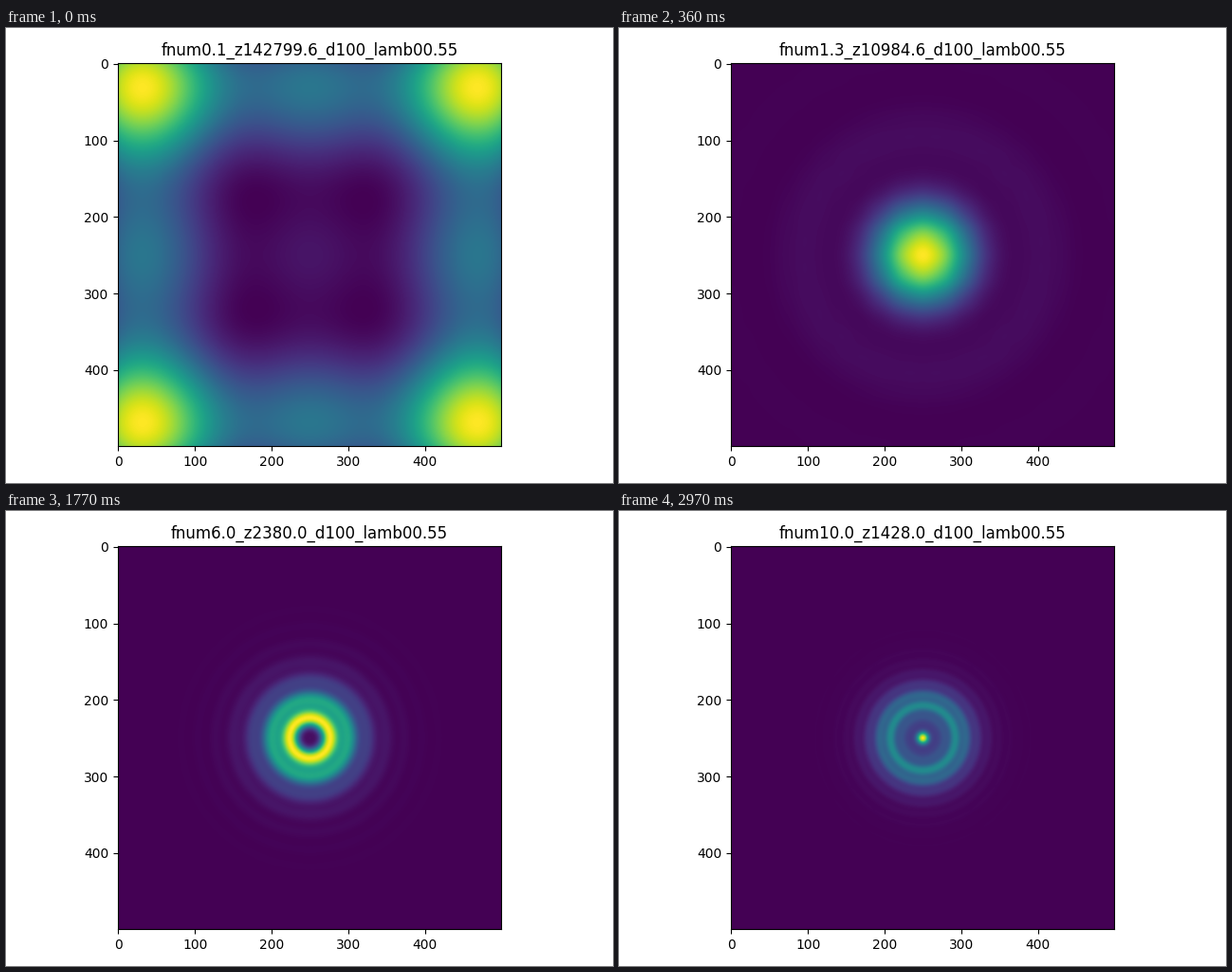
Recreate the animation shown at these times as a matplotlib script. Size 640 by 480 pixels, loop 3 s.

```python
import numpy as np
import matplotlib.pyplot as plt
from matplotlib.animation import FuncAnimation

FRAMES = 100
PIXELS = 500
WIDTH = 300.0      # simulated window, micrometres
DIAMETER = 100
LAMB = 0.55        # wavelength, micrometres
PI = 3.141592

step = WIDTH / PIXELS
axis = (np.arange(PIXELS) - PIXELS // 2) * step
x, y = np.meshgrid(axis, axis)
aperture = (x**2 + y**2 <= (DIAMETER / 2) ** 2).astype(float)

# Zero padding to twice the window halves the frequency step. The aperture
# is even, so cosines are enough for the transform and its inverse.
freq_step = 1 / (2 * WIDTH)
freq = np.arange(PIXELS) * freq_step
basis = np.cos(2 * np.pi * np.outer(axis, freq))
weight = np.where(freq > 0, 2.0, 1.0)
spectrum = np.outer(weight, weight) * (basis.T @ aperture @ basis)


def distance(fnum):
    return PI * (DIAMETER / 2) ** 2 / (LAMB * fnum)


def intensity(z):
    """Band-limited angular spectrum propagation over distance z."""
    limit = 1 / (LAMB * np.hypot(2 * freq_step * z, 1))
    n = np.count_nonzero(freq < limit)
    f_sq = freq[:n] ** 2
    kz = 2 * np.pi * np.sqrt(1 / LAMB**2 - f_sq[:, None] - f_sq + 0j)
    waves = basis[:, :n]
    field = waves @ (spectrum[:n, :n] * np.exp(1j * kz * z)) @ waves.T
    return np.abs(field) ** 2


fig, ax = plt.subplots(figsize=(6.4, 4.8), dpi=100)
image = ax.imshow(np.zeros((PIXELS, PIXELS)), cmap="viridis")
title = ax.set_title("")


def update(i):
    fnum = (i + 1) / 10
    z = distance(fnum)
    image.set_data(intensity(z))
    image.autoscale()
    title.set_text(f"fnum{fnum:.1f}_z{z:.1f}_d{DIAMETER}_lamb0{LAMB}")
    return image, title


update(0)
fig.tight_layout()
anim = FuncAnimation(fig, update, frames=FRAMES, interval=30,
                     repeat=True, repeat_delay=0)
plt.show()
```
